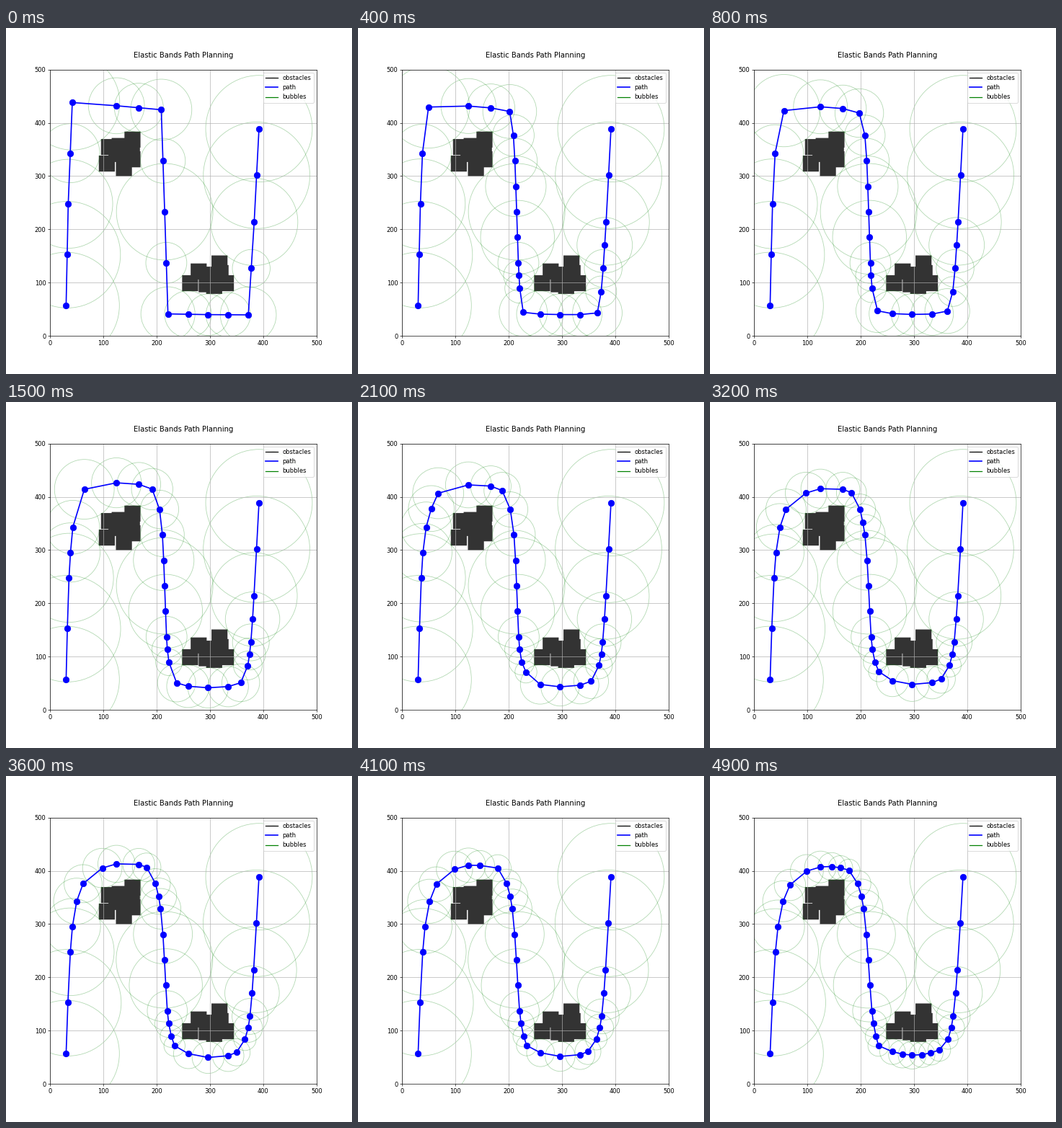
Recreate the animation shown at these times as a matplotlib script. Size 480 by 480 pixels, loop 5.1 s.

```python
import matplotlib.pyplot as plt
import numpy as np
from matplotlib.animation import FuncAnimation
from matplotlib.patches import Circle

STEPS = 50
HOLD = 1  # extra ticks on the last pose
SIZE = 500
SIDE = 30

MIN_RADIUS, MAX_RADIUS = 10, 100
RHO0 = 20.0  # range of the repulsive force
KC = 0.05  # contraction gain
KR = 0.1  # repulsion gain
OVERLAP = 0.7
GRAD_STEP = 3.0

WAYPOINTS = [(30, 57), (38, 439), (211, 425), (219, 41), (374, 39), (392, 389)]

# Lower left cells of the square obstacles
CORNERS = np.array([
    (92, 308), (96, 339), (116, 341), (140, 353), (140, 316),
    (124, 299), (110, 326), (139, 330),
    (248, 84), (264, 106), (279, 82), (293, 79), (315, 84),
    (303, 121), (305, 103), (285, 100),
])


def clearance(pos):
    """Distance from the cell holding pos to the nearest obstacle cell."""
    cell = np.asarray(pos).astype(int)
    nearest = np.clip(cell, CORNERS, CORNERS + SIDE - 1)
    return np.hypot(*(nearest - cell).T).min()


def make_bubble(pos):
    pos = np.array(pos, dtype=float)
    return pos, float(np.clip(clearance(pos), MIN_RADIUS, MAX_RADIUS))


def overlaps(a, b):
    return np.linalg.norm(a[0] - b[0]) <= OVERLAP * (a[1] + b[1])


def maintain(band):
    """Fill gaps in the chain, then drop redundant bubbles."""
    i = 0
    while i < len(band) - 1:
        if not overlaps(band[i], band[i + 1]):
            band.insert(i + 1, make_bubble((band[i][0] + band[i + 1][0]) / 2))
            i += 1
        i += 1
    i = 1
    while i < len(band) - 1:
        if overlaps(band[i - 1], band[i + 1]):
            del band[i]
        else:
            i += 1
    return band


def unit(v):
    return v / (np.linalg.norm(v) + 1e-6)


def repulsion(pos, radius):
    if radius >= RHO0:
        return np.zeros(2)
    steps = GRAD_STEP * np.eye(2)
    grad = [(clearance(pos + s) - clearance(pos - s)) / (2 * GRAD_STEP)
            for s in steps]
    return KR * (RHO0 - radius) * np.array(grad)


def advance(band):
    moved = [band[0]]
    for (prev, _), (pos, radius), (after, _) in zip(band, band[1:], band[2:]):
        force = KC * (unit(prev - pos) + unit(after - pos))
        force = force + repulsion(pos, radius)
        v = prev - after
        force = force - force * v * v / (v @ v + 1e-6)
        moved.append(make_bubble(np.clip(pos + radius * force, 0, SIZE - 1)))
    moved.append(band[-1])
    return maintain(moved)


def simulate():
    band = maintain([make_bubble(p) for p in WAYPOINTS])
    poses = []
    for _ in range(STEPS):
        band = advance(band)
        poses.append(band)
    return poses


poses = simulate()

grid = np.zeros((SIZE, SIZE))
for x, y in CORNERS:
    grid[y:y + SIDE, x:x + SIDE] = 1

fig, ax = plt.subplots(figsize=(8, 8), dpi=60)
ax.imshow(grid, origin="lower", cmap="binary", alpha=0.8)
ax.set(xlim=(0, SIZE), ylim=(0, SIZE))
ax.set_title("Elastic Bands Path Planning\n")
ax.grid(True)
ax.plot([], [], color="black", label="obstacles")
path, = ax.plot([], [], "b-", linewidth=2, label="path")
dots, = ax.plot([], [], "bo", markersize=10)
ax.plot([], [], color="green", label="bubbles")
ax.legend(loc="upper right")


def draw(tick):
    band = poses[min(tick, STEPS - 1)]
    points = np.array([pos for pos, _ in band])
    path.set_data(*points.T)
    dots.set_data(*points.T)
    for patch in list(ax.patches):
        patch.remove()
    for pos, radius in band:
        ax.add_patch(Circle(pos, radius, fill=False, color="g", alpha=0.3))
    return [path, dots, *ax.patches]


anim = FuncAnimation(fig, draw, frames=STEPS + HOLD, interval=100,
                     repeat=True, repeat_delay=0, blit=False)
plt.show()
```
